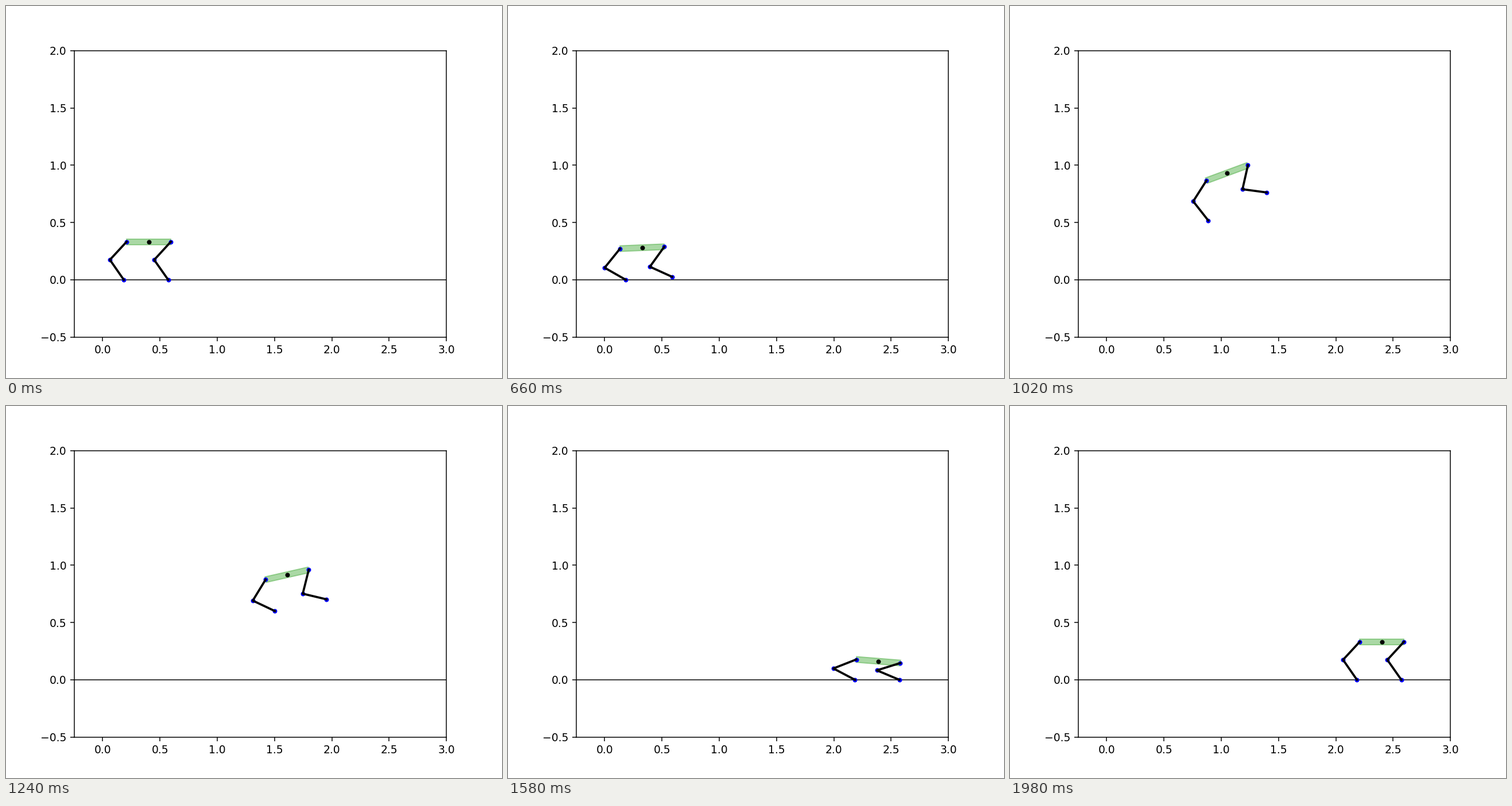
Write a matplotlib script that moves like this. It is 864 px wide and 648 px high and loops after 2000 ms.

```python
import numpy as np
import matplotlib.pyplot as plt
from matplotlib.animation import FuncAnimation
from matplotlib.patches import Polygon

FRAMES, DT = 100, 0.02
CROUCH, LAUNCH, LAND, LOW = 30, 40, 75, 79
THIGH, CALF = 0.2145, 0.2125
HALF_LEN, HALF_H = 0.193, 0.025
REAR_X, FRONT_X, JUMP = 0.184, 0.5715, 2.0
GRAVITY = np.array([0, -9.81, 0])

# A pose is (frame, [x, y, pitch], velocity per second).
REST = np.zeros(3)
stand = np.array([0.4015, 0.332, 0])
launch = np.array([0.4927, 0.4735, 0.41])
launch_v = np.array([2.539, 3.166, 0])

air = (LAND - LAUNCH) * DT
land = launch + launch_v * air + GRAVITY * air**2 / 2
land_v = launch_v + GRAVITY * air
land[2], land_v[2] = 0.047, -0.61

POSES = [
    (1, stand, REST),
    (CROUCH, np.array([0.322, 0.273, -0.06]), np.array([0, 0.125, 0])),
    (LAUNCH, launch, launch_v),
    (LAND, land, land_v),
    (LOW, np.array([2.388, 0.162, -0.08]), np.array([0.2, 0, -1.66])),
    (FRAMES - 1, stand + [JUMP, 0, 0], REST),
]


def body(k):
    """Cubic between poses; over the flight this is the exact parabola."""
    k = max(k, POSES[0][0])
    for (a, p, v), (b, q, w) in zip(POSES, POSES[1:]):
        if k <= b:
            break
    s, t = (k - a) / (b - a), (b - a) * DT
    ease = s * s * (3 - 2 * s)
    x, y, pitch = (p + (q - p) * ease
                   + t * s * (1 - s) * ((1 - s) * v - s * w))
    return np.array([x, y]), pitch


def axis(angle):
    return np.array([np.cos(angle), np.sin(angle)])


def hip(k, side):
    pos, pitch = body(k)
    return pos + side * HALF_LEN * axis(pitch)


def reach(start, foot):
    """Thigh and calf angles from straight down, knee pointing back."""
    dx, dy = foot - start
    d = min(np.hypot(dx, dy), THIGH + CALF - 1e-6)
    aim = np.arctan2(dx, -dy)
    a = np.arccos((THIGH**2 + d**2 - CALF**2) / (2 * THIGH * d))
    b = np.arccos((CALF**2 + d**2 - THIGH**2) / (2 * CALF * d))
    return np.array([aim - a, aim + b])


def make_leg(side, foot_x, lift, swing):
    """Planted foot on the ground, swinging joints in the air."""
    def planted(k):
        x = foot_x + (JUMP if k >= LAND else 0)
        return reach(hip(k, side), np.array([x, 0]))

    first, last = planted(lift), planted(LAND)

    def leg(k):
        if lift < k < LAND:
            s = (k - lift) / (LAND - lift)
            angles = (first + (last - first) * s
                      + np.array(swing) * np.sin(np.pi * s)**1.5)
        else:
            angles = planted(k)
        top = hip(k, side)
        knee = top + THIGH * axis(angles[0] - np.pi / 2)
        foot = knee + CALF * axis(angles[1] - np.pi / 2)
        return np.array([top, knee, foot])

    return leg


rear = make_leg(-1, REAR_X, LAUNCH, (-0.094, 0.49))
front = make_leg(1, FRONT_X, CROUCH, (0.32, 0.335))

fig, ax = plt.subplots(figsize=(6.4, 4.8), dpi=135)
fig.subplots_adjust(left=0.1252)
ax.set_aspect("equal")
ax.set_xlim(-0.25, 3)
ax.set_ylim(-0.5, 2)
ax.axhline(0, color="black", lw=0.8)

torso = Polygon(np.zeros((4, 2)), closed=True, color="#2c9f20", alpha=0.4, lw=1)
ax.add_patch(torso)
joints, = ax.plot([], [], "o", color="blue", ms=3.25, zorder=3)
limbs = [ax.plot([], [], color="black", lw=2, zorder=4)[0] for _ in range(2)]
center, = ax.plot([], [], "o", color="black", ms=3.25, zorder=5)


def draw(k):
    pos, pitch = body(k)
    along = HALF_LEN * axis(pitch)
    up = HALF_H * axis(pitch + np.pi / 2)
    torso.set_xy([pos - along - up, pos + along - up,
                  pos + along + up, pos - along + up])
    legs = rear(k), front(k)
    for line, pts in zip(limbs, legs):
        line.set_data(*pts.T)
    joints.set_data(*np.vstack(legs).T)
    center.set_data([pos[0]], [pos[1]])
    return [torso, joints, *limbs, center]


anim = FuncAnimation(fig, draw, frames=FRAMES, interval=1000 * DT, repeat=True)
plt.show()
```
